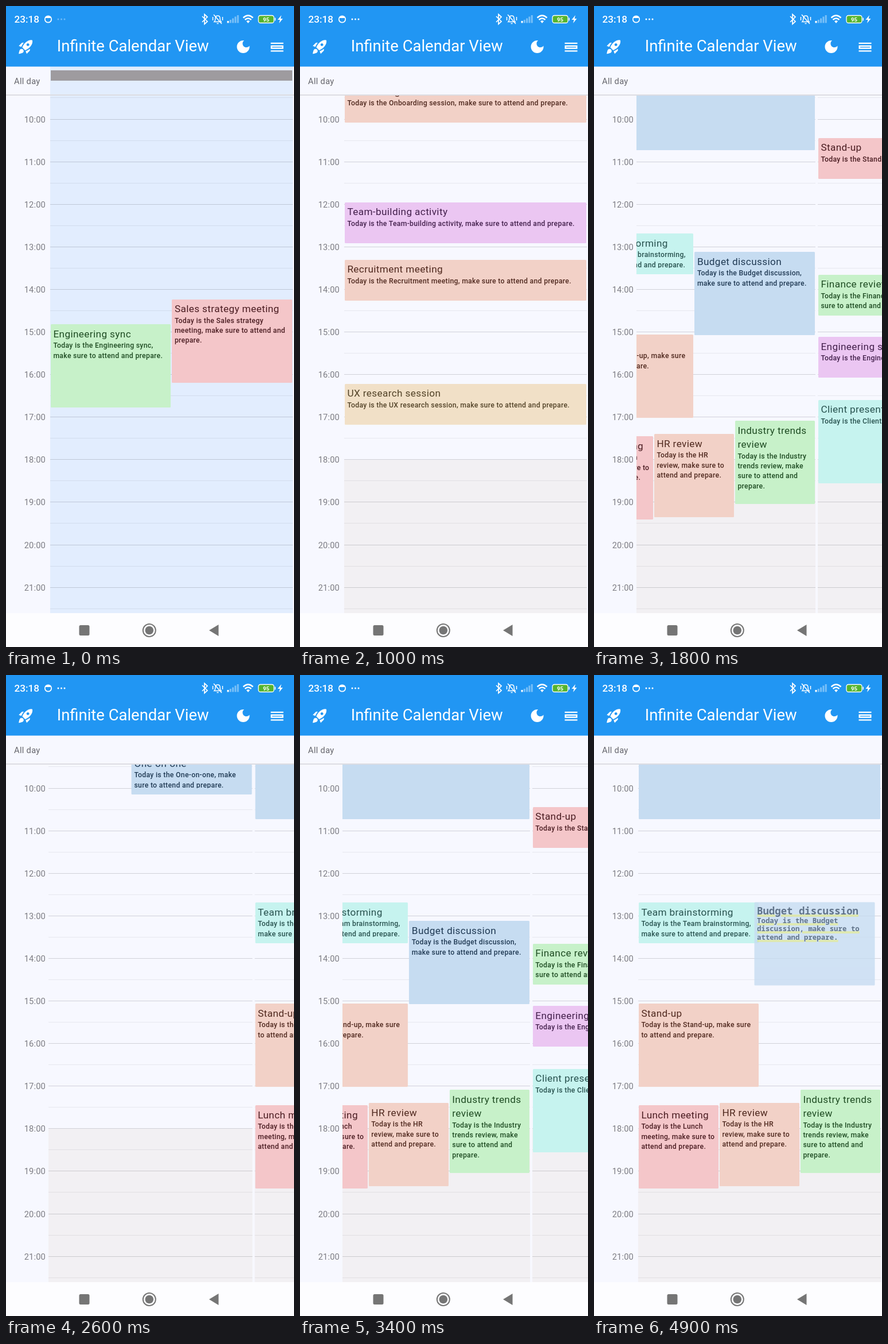
An HTML page that plays this animation: 502 px wide and 1116 px high, repeating every 5 s.

```html
<!DOCTYPE html>
<html lang="en">
<head>
<meta charset="utf-8">
<title>Infinite Calendar View</title>
<style>
  html, body { margin: 0; width: 100%; height: 100%; overflow: hidden; background: #f7f8ff; }
  body { position: relative; font-family: Roboto, sans-serif; }
  div, svg { position: absolute; box-sizing: border-box; }
  #chrome { left: 0; top: 0; }
  .clip { left: 74px; width: 428px; overflow: hidden; }
  #lanes { top: 105px; height: 50px; }
  #grid { top: 155px; height: 902px; }
  .track { left: 2.5px; top: 0; height: 100%; }
  .day { top: 0; width: 423px; height: 100%; }
  .line { left: 0; right: 0; height: 1px; background: rgba(20, 20, 30, .17); }
  .line.half { background: rgba(20, 20, 30, .075); }
  .event { border-radius: 1.5px; }
  .text { inset: 4.9px 3.9px 11.5px 4.9px; overflow: hidden; letter-spacing: .306px; }
  .text p { margin: 0; font-size: 12.25px; line-height: 17.3px; font-weight: 500; }
  .text p:first-child { font-size: 17.2px; line-height: 24.5px; letter-spacing: .37px; font-weight: 400; }
  .hour { left: 0; width: 69px; text-align: right; font-size: 14.7px; line-height: 20px;
          letter-spacing: .15px; color: #7d7d83; }
  #allDay { left: 14px; top: 121px; font-size: 14.7px; line-height: 20px; letter-spacing: .3px; color: #65656b; }
  #divider { left: 0; top: 154px; width: 502px; height: 2px; background: #dddde2; }
  #dragged { opacity: .78; }
  #dragged .text { inset: 4.5px 4.5px 0; text-decoration: underline double #ecee48 1px;
                   font-family: "Noto Sans Mono", monospace; }
  #dragged p { line-height: 14.8px; letter-spacing: .1px; font-weight: 600; color: #38506a; }
  #dragged p:first-child { line-height: 20px; font-weight: 700; }
</style>
</head>
<body>
<div id="lanes" class="clip"><div class="track"></div></div>
<div id="grid" class="clip"><div class="track"></div></div>
<div id="allDay">All day</div>
<div id="divider"></div>

<svg id="chrome" width="502" height="1116" fill="#fff" font-family="Roboto, sans-serif">
  <path fill="#2196f3" d="M0 0h502v105.500H0z"/>
  <text x="14.5" y="29" font-size="17.2" font-weight="500">23:18</text>
  <g fill="none" stroke="#fff" stroke-width="1.7">
    <circle cx="73.500" cy="23" r="5.700"/>
    <path d="M69 19.500h9" stroke-width="3"/>
    <path d="M342 18l9 9-5 4.500v-17l5 4.500-9 9"/>
    <path d="M363 27.500c2-2 2-4 2-6 0-6 8-6 8 0 0 2 0 4 2 6zM367.500 30.500h3M362 15l14 16M360.500 19v6M377.500 19v6" stroke-width="1.500"/>
    <path d="M413.500 20.500q8.500-8 17 0M416.500 24q5.500-5 11 0" stroke-width="2.500"/>
    <rect x="440" y="16.500" width="27" height="13" rx="3.500" fill="#55b42e" stroke-width="1.300"/>
  </g>
  <path d="M419 26.500q3.500-2.500 6 0l-3 3.500zM468.500 20.500h1.500v5h-1.500zM480 16l-6.500 8h4l-1.500 6 6.500-8h-4zM385.500 26h3v3.500h-3z"/>
  <path opacity=".4" d="M389.800 24h3v5.500h-3zM394.100 21.500h3v8h-3zM398.400 18.500h3v11h-3zM402.700 16h3v13.500h-3z"/>
  <text x="453.500" y="26.700" font-size="9.500" font-weight="700" text-anchor="middle">95</text>
  <g id="dots"><circle cx="91" cy="23" r="1.500"/><circle cx="96.500" cy="23" r="1.500"/><circle cx="102" cy="23" r="1.500"/></g>

  <text x="88.700" y="79.300" font-size="27.450">Infinite Calendar View</text>
  <path transform="translate(19.800 56.300) scale(1.225)" fill-rule="evenodd" d="M9.190 6.350c-2.040 2.290-3.440 5.580-3.570 5.890L2 10.690l4.050-4.050c.47-.47 1.150-.68 1.810-.55zM11.170 17s3.740-1.550 5.890-3.700c5.400-5.400 4.500-9.620 4.210-10.570-.95-.3-5.170-1.190-10.570 4.210C8.550 9.090 7 12.830 7 12.830zm6.480-2.190c-2.290 2.040-5.580 3.440-5.890 3.570L13.310 22l4.050-4.050c.47-.47.68-1.150.55-1.810zM9 18c0 .83-.34 1.580-.88 2.120C6.940 21.300 2 22 2 22s.7-4.940 1.880-6.120C4.420 15.340 5.170 15 6 15c1.660 0 3 1.340 3 3zm4-9c0-1.100.9-2 2-2s2 .9 2 2-.9 2-2 2-2-.9-2-2z"/>
  <path transform="translate(398.800 56.300) scale(1.225)" d="M12 3c-4.970 0-9 4.030-9 9s4.030 9 9 9 9-4.030 9-9c0-.46-.04-.92-.1-1.360-.98 1.370-2.580 2.260-4.400 2.260-2.980 0-5.400-2.420-5.400-5.400 0-1.810.89-3.420 2.260-4.400C12.920 3.040 12.460 3 12 3z"/>
  <path transform="translate(457.800 56.300) scale(1.225)" fill-rule="evenodd" d="M3 6h18v2H3zM3 10h18v5H3zM5 12v1h14v-1zM3 17h18v2H3z"/>

  <path fill="#fdfdff" d="M0 1057h502v59H0z"/>
  <g fill="#757575">
    <rect x="127.500" y="1078" width="18" height="18" rx="2.500"/>
    <circle cx="249.800" cy="1087" r="11" fill="none" stroke="#757575" stroke-width="2"/>
    <circle cx="249.800" cy="1087" r="7.300"/>
    <path d="M354 1087l16.500-10v20z"/>
  </g>
</svg>

<script>
const LOOP = 5000, STEP = 100;
const PITCH = 427, DAY_WIDTH = 423, HOUR = 74.1, GRID_TOP = 155, CLOSING = 18;
const hourY = h => 197 + HOUR * (h - 10);

// background, text
const COLORS = {
  green: ['#c7f1c9', '#1f4c23'], red: ['#f4c6c9', '#4b1d22'], teal: ['#c6f3ef', '#28524f'],
  tan: ['#f1e0c7', '#524227'], peach: ['#f2d1c7', '#50291f'], purple: ['#ebc6f2', '#43204c'],
  khaki: ['#f0ecc4', '#56532c'], blue: ['#c6dcf1', '#203a54'],
};

// top, hours, slot, slots, color, title
const DAYS = [
  [[554, 2, 0, 2, 'green', 'Engineering sync'],
   [510.5, 2, 1, 2, 'red', 'Sales strategy meeting']],
  [[142, 1, 1, 2, 'teal', 'Sales training session'],
   [427.5, 2, 1, 2, 'tan', 'Webinar planning']],
  [[132, 1, 0, 1, 'peach', 'Onboarding session'],
   [341.5, 1, 0, 1, 'purple', 'Team-building activity'],
   [441.5, 1, 0, 1, 'peach', 'Recruitment meeting'],
   [657.5, 1, 0, 1, 'tan', 'UX research session']],
  [[273.5, 2, 0, 1, 'green', 'Finance review'],
   [626.5, 1, 1, 2, 'khaki', 'Webinar planning'],
   [711, 1, 1, 2, 'teal', 'Team-building activity']],
  [[211.5, 1, 0, 1, 'teal', 'Legal briefing'],
   [313, 1, 0, 1, 'khaki', 'Marketing campaign planning'],
   [615.5, 1, 0, 1, 'green', 'Legal briefing']],
  [[137, 1, 1, 2, 'blue', 'One-on-one']],
  [[105.5, 2, 0, 1, 'blue', 'Product demo'],
   [396, 1, 0, 2, 'teal', 'Team brainstorming'],
   [428, 2, 1, 2, 'blue', 'Budget discussion'],
   [572, 2, 0, 2, 'peach', 'Stand-up'],
   [749, 2, 0, 3, 'red', 'Lunch meeting'],
   [745, 2, 1, 3, 'peach', 'HR review'],
   [722, 2, 2, 3, 'green', 'Industry trends review']],
  [[229.5, 1, 0, 1, 'red', 'Stand-up'],
   [467.5, 1, 0, 2, 'green', 'Finance review'],
   [576, 1, 0, 1, 'purple', 'Engineering sync'],
   [685.5, 2, 0, 1, 'teal', 'Client presentation']],
];

// time, scroll position in days
const SCROLL = [
  [0, 0], [200, .5], [350, 1.4], [500, 1.877], [700, 2], [1100, 2], [1400, 3.688], [1600, 5.2],
  [1800, 6.267], [1950, 6.4], [2300, 5.6], [2600, 5.165], [2800, 5], [2950, 5], [3200, 5.8],
  [3400, 6.232], [3500, 6.25], [3800, 6], [LOOP, 6],
];
const DRAG_START = 4500, DRAG_END = 4900;

function box(parent, className, style) {
  const el = document.createElement('div');
  el.className = className;
  for (const key in style) {
    el.style[key] = typeof style[key] === 'number' ? style[key] + 'px' : style[key];
  }
  return parent.appendChild(el);
}

function addEvent(parent, [top, hours, slot, slots, color, title]) {
  const [background, ink] = COLORS[color], width = DAY_WIDTH / slots;
  const event = box(parent, 'event', {
    left: slot * width + 1, top: top - GRID_TOP, width: width - 2, height: hours * HOUR - 3, background, color: ink,
  });
  box(event, 'text').innerHTML =
    `<p>${title}</p><p>Today is the ${title}, make sure to attend and prepare.</p>`;
  return event;
}

const laneTrack = document.querySelector('#lanes .track');
const gridTrack = document.querySelector('#grid .track');
let source;
DAYS.forEach((events, index) => {
  const today = index === 0, left = index * PITCH;
  const background = today ? '#e2edfe' : 'transparent';
  if (today) {
    const lane = box(laneTrack, 'day', { left, background });
    box(lane, '', { left: 1, top: 6.5, width: 421, height: 18.5, background: '#9e9b9f' });
  }
  const day = box(gridTrack, 'day', { left, background });
  if (!today) {
    box(day, '', { left: 0, right: 0, top: hourY(CLOSING) - GRID_TOP, bottom: 0, background: '#f2f0f3' });
  }
  for (let h = 9.5; h <= 21.5; h += .5) {
    box(day, h % 1 ? 'line half' : 'line', { top: Math.round(hourY(h) - GRID_TOP - .5) });
  }
  for (const data of events) {
    const event = addEvent(day, data);
    if (data[5] === 'Budget discussion') source = event;
  }
});

for (let h = 10; h <= 21; h++) {
  box(document.body, 'hour', { top: hourY(h) - 9.5 }).textContent = h + ':00';
}

const dragged = source.cloneNode(true);
dragged.id = 'dragged';
dragged.style.left = '289px';
dragged.style.top = '428px';
document.body.append(dragged);
const dots = document.getElementById('dots');

const slope = i => (SCROLL[i + 1][1] - SCROLL[i][1]) / (SCROLL[i + 1][0] - SCROLL[i][0]);

// Zero at turning points, so the scroll never overshoots its keys.
function tangent(i) {
  if (i === 0 || i === SCROLL.length - 1) return 0;
  const a = slope(i - 1), b = slope(i);
  return a * b > 0 ? 2 * a * b / (a + b) : 0;
}

function scrollAt(t) {
  const i = SCROLL.findIndex((key, k) => k < SCROLL.length - 1 && t < SCROLL[k + 1][0]);
  const [t0, p0] = SCROLL[i], [t1, p1] = SCROLL[i + 1];
  const span = t1 - t0, u = (t - t0) / span, v = 1 - u;
  return p0 * (1 + 2 * u) * v * v + p1 * (1 + 2 * v) * u * u
    + span * u * v * (tangent(i) * v - tangent(i + 1) * u);
}

function render(now) {
  const t = Math.floor(now % LOOP / STEP) * STEP;
  const shift = `translateX(${-scrollAt(t) * PITCH}px)`;
  laneTrack.style.transform = gridTrack.style.transform = shift;
  dots.style.opacity = t ? 1 : .35;

  const dragging = t >= DRAG_START;
  source.style.visibility = dragging ? 'hidden' : 'visible';
  dragged.style.visibility = dragging ? 'visible' : 'hidden';
  const u = Math.max(0, Math.min(1, (t - DRAG_START) / (DRAG_END - DRAG_START)));
  const eased = u * u * (3 - 2 * u);
  dragged.style.transform = `translate(${-9.5 * eased}px, ${-32.5 * eased}px)`;
}

let start;
function frame(now) {
  start ??= now;
  render(Math.max(0, now - start));
  requestAnimationFrame(frame);
}
render(0);
requestAnimationFrame(frame);
</script>
</body>
</html>
```
